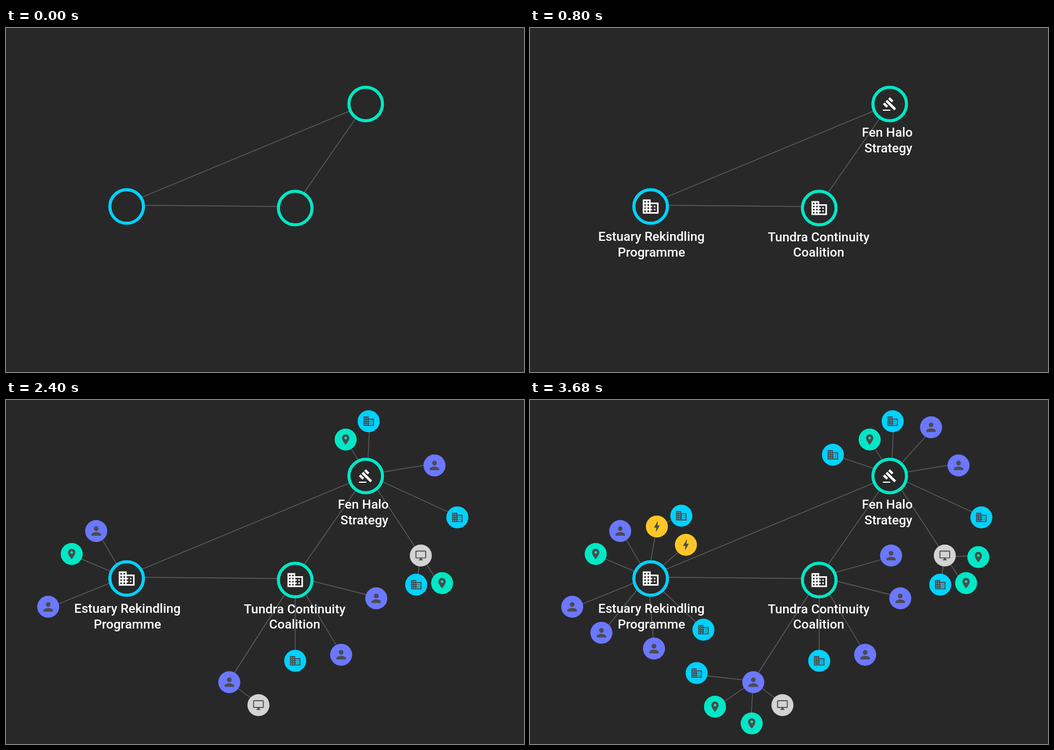
Animation of 917 by 611 pixels, one loop 4000 ms. Source, as an HTML page:

```html
<!DOCTYPE html>
<html lang="en">
<head>
<meta charset="utf-8">
<title>Growing network</title>
<style>
  html, body { margin: 0; width: 100%; height: 100%; overflow: hidden; background: #282828; }
  svg { display: block; width: 100vw; height: 100vh; }
  line { stroke: #5e5e5e; stroke-width: 1.4; }
  text { font: 500 22.7px Roboto, sans-serif; fill: #fff; text-anchor: middle; }
</style>
</head>
<body>
<svg id="stage" viewBox="0 0 917 611"></svg>
<script>
const STEP = 800, STEPS = 5;
const TEAL = '#00e8c6', BLUE = '#00d2ff', PURPLE = '#6b78ff', GREY = '#d3d3d3', AMBER = '#ffc627';
const stage = document.getElementById('stage');

// Icons on a 24-unit grid: path, small scale
const icons = {
  office: ['M12 7V3H2v18h20V7H12zM6 19H4v-2h2v2zm0-4H4v-2h2v2zm0-4H4V9h2v2zm0-4H4V5h2v2zm4 12H8v-2h2v2zm0-4H8v-2h2v2zm0-4H8V9h2v2zm0-4H8V5h2v2zm10 12h-8v-2h2v-2h-2v-2h2v-2h-2V9h8v10zm-2-8h-2v2h2v-2zm0 4h-2v2h2v-2z', .93],
  pin: ['M12 2C8.13 2 5 5.13 5 9c0 5.25 7 13 7 13s7-7.75 7-13c0-3.87-3.13-7-7-7zm0 9.5a2.5 2.5 0 0 1 0-5 2.5 2.5 0 0 1 0 5z', .92],
  person: ['M12 12a4 4 0 0 0 0-8 4 4 0 0 0 0 8zm0 2c-2.67 0-8 1.34-8 4v2h16v-2c0-2.66-5.33-4-8-4z', 1.05],
  screen: ['M21 2H3c-1.1 0-2 .9-2 2v12c0 1.1.9 2 2 2h7v2H8v2h8v-2h-2v-2h7c1.1 0 2-.9 2-2V4c0-1.1-.9-2-2-2zm0 14H3V4h18v12z', .86],
  bolt: ['M11 21h-1l1-7H7.5c-.88 0-.33-.75-.31-.78C8.48 10.94 10.42 7.54 13 3h1l-1 7h3.5c.4 0 .62.19.4.66C12.97 17.55 11 21 11 21z', .97],
  gavel: ['M1 21h12v2H1zM5.24 8.07l2.83-2.83 14.14 14.14-2.83 2.83zM12.32 1l5.66 5.66-2.83 2.83-5.66-5.66zM3.83 9.48l5.66 5.66-2.83 2.83L1 12.31z', .93]
};

function add(parent, tag, attrs, text) {
  const el = document.createElementNS(stage.namespaceURI, tag);
  for (const k in attrs) el.setAttribute(k, attrs[k]);
  if (text) el.textContent = text;
  return parent.appendChild(el);
}

// Each layer holds one group per step
const makeLayer = () => Array.from({ length: STEPS }, () => add(stage, 'g', {}));
const links = makeLayer(), nodes = makeLayer(), labels = makeLayer();

function link(step, x1, y1, x2, y2) {
  add(links[step], 'line', { x1, y1, x2, y2 });
}

function icon(parent, name, x, y, scale, fill) {
  add(parent, 'path', {
    d: icons[name][0], fill,
    transform: `translate(${x} ${y}) scale(${scale}) translate(-12 -12)`
  });
}

function hub(x, y, color, name, scale, lines) {
  add(nodes[0], 'circle', { cx: x, cy: y, r: 29.75, fill: '#282828', stroke: color, 'stroke-width': 5.5 });
  icon(nodes[1], name, x, y, scale, '#fff');
  for (const [tx, ty, words] of lines) add(labels[1], 'text', { x: tx, y: ty }, words);
}

const kinds = { office: BLUE, pin: TEAL, person: PURPLE, screen: GREY, bolt: AMBER };

// A small node with a link from (ax, ay) to (bx, by)
function leaf(step, name, x, y, ax, ay, bx, by) {
  link(step, ax, ay, bx, by);
  add(nodes[step], 'circle', { cx: x, cy: y, r: 19.5, fill: kinds[name] });
  icon(nodes[step], name, x, y, icons[name][1], '#4b4b4d');
}

link(0, 214, 311.7, 637, 135.5);
link(0, 214, 314.7, 512, 317.3);
link(0, 637, 134.6, 512, 315);

hub(213.6, 317.1, BLUE, 'office', 1.4, [[215, 378, 'Estuary Rekindling'], [215, 406, 'Programme']]);
hub(512, 319.8, TEAL, 'office', 1.37, [[511, 378.5, 'Tundra Continuity'], [511, 406, 'Coalition']]);
hub(636.8, 135, TEAL, 'gavel', 1.1, [[632.5, 193, 'Fen Halo'], [634.5, 220.5, 'Strategy']]);

leaf(2, 'pin', 601.3, 70.3, 601, 71, 637, 128);
leaf(2, 'office', 799, 208.5, 799, 206.4, 637, 131.7);
leaf(2, 'pin', 772, 325.3, 766, 325, 640, 132.6);
leaf(2, 'person', 655.5, 352.2, 655, 350, 512, 314);
leaf(2, 'pin', 116.3, 273.5, 116, 275, 214, 316.7);

leaf(3, 'office', 642, 37.7, 643.7, 38, 640, 128);
leaf(3, 'person', 758.6, 116.2, 758, 113, 637, 133);
leaf(3, 'screen', 734.3, 276.2, 734, 276, 727, 328);
leaf(3, 'office', 726.2, 328, 734, 276, 727, 328);
leaf(3, 'person', 159.7, 232.7, 161.7, 233, 212, 319.5);
leaf(3, 'person', 74.7, 367.3, 75, 369.3, 214, 313);
leaf(3, 'person', 395.3, 501.2, 393.7, 501, 510, 319.5);
leaf(3, 'office', 512, 463.2, 512, 463, 512, 320);
leaf(3, 'person', 593.3, 452.4, 594.6, 452, 515, 319.5);
leaf(3, 'screen', 446.9, 541.9, 447, 539.5, 395, 500.5);

leaf(4, 'office', 536.2, 97.3, 536, 97.3, 637, 131);
leaf(4, 'person', 710, 48.4, 710, 53.6, 637, 135.7);
leaf(4, 'pin', 793.7, 279, 794, 276.5, 734, 278.5);
leaf(4, 'person', 639.2, 276.3, 639, 278.6, 512, 314.5);
leaf(4, 'office', 267.9, 205.6, 268, 203, 225, 227);
leaf(4, 'bolt', 224.6, 224.8, 224.4, 225, 209, 314);
leaf(4, 'bolt', 276, 257.3, 276, 259, 214, 312);
leaf(4, 'person', 126.4, 413.4, 127, 415, 206, 316.5);
leaf(4, 'person', 219.5, 441.5, 219.6, 441, 209.3, 317);
leaf(4, 'office', 307, 408, 307, 407.3, 212, 317.3);
leaf(4, 'office', 295, 485, 295, 488, 395, 499);
leaf(4, 'pin', 327.5, 544.7, 327, 547, 395, 500.6);
leaf(4, 'pin', 392.5, 574.4, 391, 574, 395, 502);

function draw(time) {
  const now = Math.floor(time / STEP) % STEPS;
  for (const layer of [links, nodes, labels])
    layer.forEach((g, i) => g.setAttribute('display', i <= now ? 'inline' : 'none'));
}

function tick() {
  draw(performance.now() - start);
  requestAnimationFrame(tick);
}

const start = performance.now();
tick();
</script>
</body>
</html>
```
